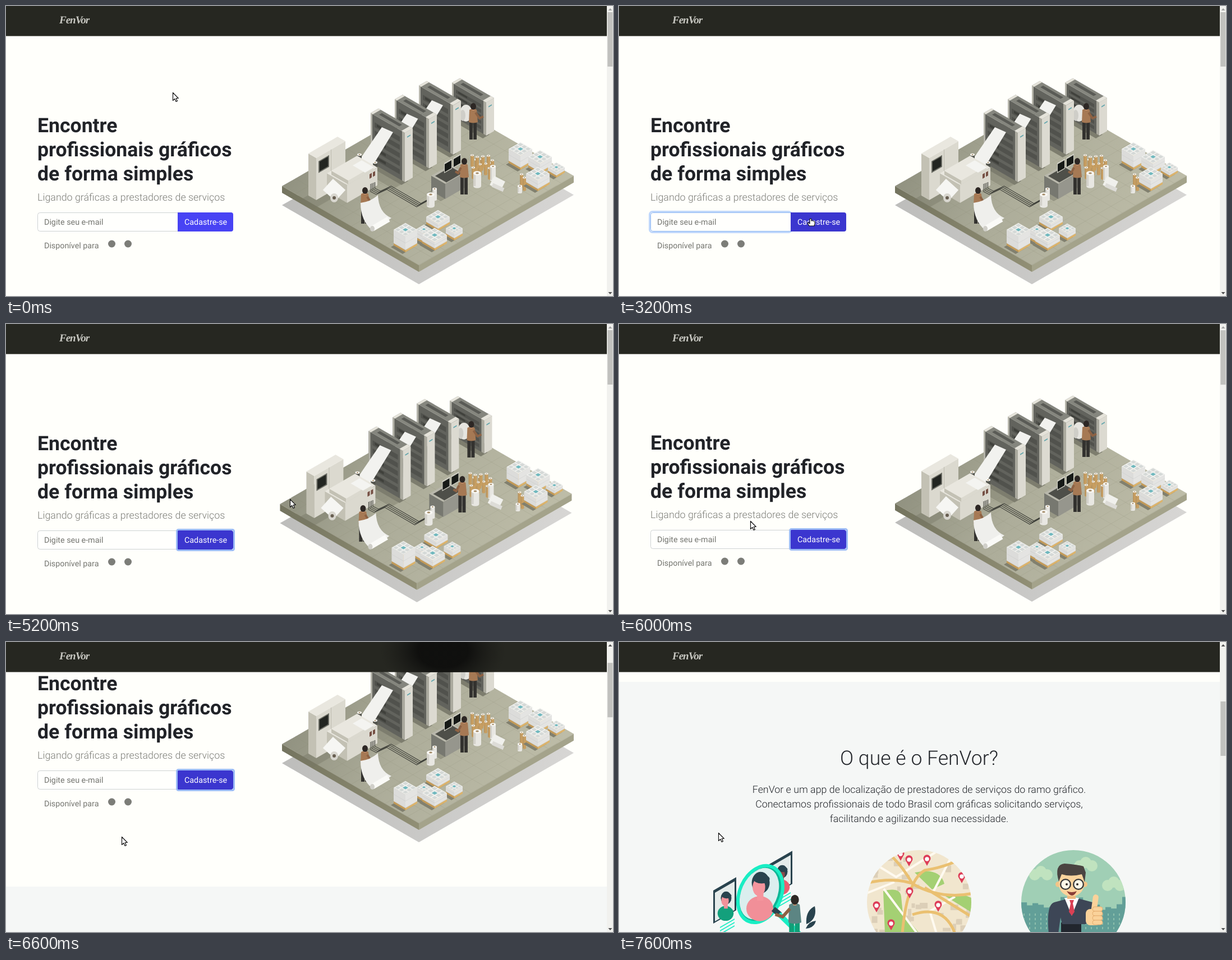
An HTML page for the animation above (8000 ms loop, 1082 px wide and 517 px high).

```html
<!DOCTYPE html>
<html lang="pt-BR">
<head>
<meta charset="utf-8">
<title>FenVor</title>
<style>
html, body { margin: 0; width: 100%; height: 100%; overflow: hidden; background: #fffffb; }
svg { display: block; }
text { font-family: Roboto, "Open Sans", sans-serif; font-size: 14.3px; fill: #747570; text-rendering: geometricPrecision; }
.title { font-size: 35.6px; font-weight: 700; fill: #212328; }
.lead { font-size: 17.85px; font-weight: 300; fill: #7b7c77; }
.about { font-size: 17.83px; font-weight: 300; fill: #22252a; text-anchor: middle; }
.about.big { font-size: 35.6px; }
.brand { font: italic 700 19px "Liberation Serif", serif; letter-spacing: -1px; fill: #c9c9c3; }
</style>
</head>
<body>
<svg width="1082" height="517" viewBox="0 0 1082 517">
  <defs>
    <linearGradient id="floor" y1=".3" y2=".6">
      <stop stop-color="#8c8d7c"/><stop offset=".45" stop-color="#adad9a"/><stop offset="1" stop-color="#bfbea9"/>
    </linearGradient>
    <linearGradient id="ground"><stop stop-color="#bdbdbb"/><stop offset="1" stop-color="#d7d6d4"/></linearGradient>
    <linearGradient id="edge"><stop stop-color="#74745f"/><stop offset="1" stop-color="#918f75"/></linearGradient>
    <radialGradient id="smoke"><stop offset=".4" stop-color="#0d0d0c" stop-opacity=".9"/><stop offset="1" stop-color="#1a1a17" stop-opacity="0"/></radialGradient>
    <clipPath id="disc"><circle r="93"/></clipPath>
    <clipPath id="barClip"><rect width="1071" height="54"/></clipPath>
  </defs>
  <rect width="1082" height="517" fill="#fffffb"/>
  <g id="page">
    <text class="title" x="56" y="225">Encontre</text>
    <text class="title" x="56" y="268">profissionais gráficos</text>
    <text class="title" x="56" y="311">de forma simples</text>
    <text class="lead" x="56" y="346.5">Ligando gráficas a prestadores de serviços</text>
    <rect id="inputRing" x="54.5" y="366.5" width="253" height="37" rx="5" fill="none" stroke="#bfd7fb" stroke-width="3"/>
    <rect id="input" x="56.5" y="368.5" width="260" height="33" rx="4" fill="#fffffd"/>
    <path id="button" d="M306 368h95a4 4 0 0 1 4 4v26a4 4 0 0 1-4 4h-95z"/>
    <rect id="buttonRing" x="304.5" y="366.5" width="102" height="37" rx="3" fill="none" stroke="#9dbcf6" stroke-width="3"/>
    <text x="68" y="390">Digite seu e-mail</text>
    <text x="318" y="390" style="fill:#fff">Cadastre-se</text>
    <text x="68" y="432">Disponível para</text>
    <circle cx="188.5" cy="424" r="6.5" fill="#7c7d78"/>
    <circle cx="217.5" cy="424" r="6.5" fill="#7c7d78"/>
    <g id="scene"></g>
    <rect y="575" width="1071" height="560" fill="#f5f7f6"/>
    <g transform="translate(0 504)">
      <text class="about big" x="535" y="219">O que é o FenVor?</text>
      <text class="about" x="535" y="269">FenVor e um app de localização de prestadores de serviços do ramo gráfico.</text>
      <text class="about" x="535" y="295">Conectamos profissionais de todo Brasil com gráficas solicitando serviços,</text>
      <text class="about" x="535" y="321">facilitando e agilizando sua necessidade.</text>
      <g id="search"></g>
      <g transform="translate(535 464)"><g id="map" clip-path="url(#disc)"></g></g>
      <g transform="translate(810 464)"><g id="man" clip-path="url(#disc)"></g></g>
    </g>
  </g>

  <g clip-path="url(#barClip)">
    <rect width="1071" height="53.6" fill="#262721"/>
    <ellipse id="haze" cx="779" cy="154" rx="112" ry="78" fill="url(#smoke)"/>
    <text class="brand" x="95" y="31">FenVor</text>
  </g>
  <rect x="1071" width="11" height="517" fill="#f1f1ee"/>
  <path id="up" d="M1073.5 8l3.5-4 3.5 4z"/><path d="M1073.5 510l3.5 4 3.5-4z" fill="#505050"/>
  <rect id="thumb" x="1072.3" y="11" width="9" height="97" fill="#c1c1be"/>

  <g id="cursor" stroke="#111" stroke-width="1.2" stroke-linejoin="round" fill="#fff">
    <path id="arrow" d="M.5.5v14l3.3-3 2.3 5 2.3-1-2.2-5h4.1z"/>
    <path id="beam" d="M-3-7h6M0-7v14M-3 7h6M-2 1h4" stroke-width="1.5"/>
    <path id="hand" d="M-3 7l-3-5 1-1 3 2v-8q1.500-2 3 0v3q4-1 6 2v3l-1 4z"/>
  </g>
</svg>
<script>
const $ = id => document.getElementById(id);
const SLOPE = .5774;
const times = (n, draw) => Array.from({length: n}, (_, i) => draw(i)).join('');
const rand = n => Math.abs(Math.sin(n * 12.9898 + 4) * 43758.5453) % 1;
const shape = (fill, d) => `<path fill="${fill}" d="${d}"/>`;
const poly = (fill, ...points) => shape(fill, `M${points.join(' ')}z`);
const line = (d, color, width = 1) => `<path d="${d}" fill="none" stroke="${color}" stroke-width="${width}"/>`;
const oval = (fill, x, y, rx, ry = rx) => `<ellipse cx="${x}" cy="${y}" rx="${rx}" ry="${ry}" fill="${fill}"/>`;
const rect = (fill, x, y, w, h) => `<rect x="${x}" y="${y}" width="${w}" height="${h}" fill="${fill}"/>`;
const place = (x, y, scale, art) => `<g transform="translate(${x} ${y}) scale(${scale})">${art}</g>`;

// Isometric helpers take the front bottom corner of a solid.
function face(fill, x, y, side, s0, s1, z0, z1) {
  const at = (s, z) => [x + side * s, y - s * SLOPE - z];
  return poly(fill, ...at(s0, z0), ...at(s1, z0), ...at(s1, z1), ...at(s0, z1));
}
function lid(fill, x, y, a0, a1, b0, b1) {
  const at = (a, b) => [x - a + b, y - (a + b) * SLOPE];
  return poly(fill, ...at(a0, b0), ...at(a1, b0), ...at(a1, b1), ...at(a0, b1));
}
const box = (x, y, a, b, h, [left, right, top]) =>
  face(left, x, y, -1, 0, a, 0, h) + face(right, x, y, 1, 0, b, 0, h) + lid(top, x, y - h, 0, a, 0, b);
const CREAM = ['#c3c1b4', '#dbd9cf', '#e9e7df'];

const press = (x, y, h) =>
  lid('#7d7d6e', x - 6, y + 5, 0, 62, 0, 12) +
  box(x, y, 61, 14, h, ['#62635d', '#dcdad1', '#85867e']) +
  face('#aaa99e', x, y, -1, 0, 5, 0, h) + face('#b5b4aa', x, y, -1, 58, 61, 0, h) +
  lid('#5a5b56', x, y - h - 1, 14, 50, 4, 9) + lid('#e5e3da', x, y - h, 0, 6, 0, 14) + lid('#e5e3da', x, y - h, 57, 61, 0, 14) +
  times(5, i => face('#51524d', x, y, -1, 9, 54, h * (.1 + i * .165), h * (.2 + i * .165)) +
    face('#3f403b', x, y, -1, 34, 50, h * (.13 + i * .165), h * (.18 + i * .165))) +
  face('#61a5ad', x, y, 1, 4, 10, h - 11, h - 9);

const sheet = (x, y) => shape('#f2f2ef', `M${x} ${y}l20 9-36 59-23-11z`);

const stack = (x, y, w, h) =>
  lid('#81806f', x - 5, y + 3, 0, w, 0, w) +
  box(x, y, w, w, 4, ['#c39a58', '#dcb36b', '#e2c58f']) +
  box(x, y - 4, w, w, h, ['#dcdcda', '#e4e4e2', '#f1f1ee']) +
  times(2, i => face('#cbccca', x, y - 4, -1, 0, w, h * i / 2, h * i / 2 + .7) +
    face('#d2d3d1', x, y - 4, 1, 0, w, h * i / 2, h * i / 2 + .7)) +
  times(9, i => {
    const a = w * (.06 + i % 3 * .32), b = w * (.06 + (i / 3 | 0) * .32);
    return lid(i == 4 ? '#70b8be' : '#d5d9d7', x, y - h - 4, a, a + w * .24, b, b + w * .24);
  });

const tube = (x, y, r, h, color = '#e8e7e2') =>
  shape(color, `M${x - r} ${y - h}v${h}a${r} ${r * .55} 0 0 0 ${2 * r} 0v${-h}z`) +
  rect('#77725f30', x - r, y - h, r * .6, h) +
  oval('#f8f7f3', x, y - h, r, r * .55) + oval('#a38a67', x, y - h, r * .4, r * .22);

const person = (x, y, reach, shirt = '#a67954', legs = '#33322f', scale = 1) => place(x, y, scale,
  rect(legs, -6, -33, 6, 33) + rect(legs, 1, -33, 6, 33) +
  shape(shirt, 'M-6-53q7-4 13 0l2 22q-8 3-16 0z') +
  line(`M${Math.sign(reach) * 5}-48l${reach / 2} 10 ${reach / 2}-3`, '#8d6244', 4) +
  rect('#d69b76', -1, -58, 4, 6) + oval('#2d2724', 1, -59, 5, 6));

function floor() {
  const slab = (fill, y) => lid(fill, 736, y, 0, 244, 0, 276);
  return slab('url(#ground)', 496) + box(736, 474, 244, 276, 12, ['url(#edge)', '#a4a38b', 'url(#floor)']) +
    times(12, i => lid('#83836f38', 736, 462, 0, 244, i * 23, i * 23 + .7) + lid('#83836f38', 736, 462, i * 20, i * 20 + .7, 0, 276)) +
    lid('#75766566', 690, 326, 0, 70, 0, 20) + lid('#75766566', 548, 362, 0, 26, 0, 60);
}

const presses = () =>
  press(856, 231, 59) + oval('#e6e5e0', 820, 191, 11, 15) + oval('#cfcec8', 814, 195, 5, 10) + person(832, 238, 14) +
  times(3, i => press(797 - 43 * i, 265 + 24.5 * i, 88) + sheet(759 - 44.5 * i, 168 + 24 * i));

const printer = () =>
  box(553, 346, 14, 52, 75, CREAM) + face('#6b6c64', 553, 346, 1, 4, 23, 46, 67) + face('#222521', 553, 346, 1, 6, 21, 48, 65) +
  face('#bdbbb0', 553, 346, 1, 26, 27, 0, 75) +
  tube(630, 274, 4, 9, '#54554e') + tube(658, 288, 4, 9, '#54554e') +
  box(608, 351, 36, 54, 32, CREAM) + box(610, 318, 30, 45, 7, CREAM) + lid('#f4f4f1', 640, 297, 0, 22, 0, 16) +
  times(2, i => face('#765044', 608, 351, 1, 40 + i * 6, 44 + i * 6, 20, 28)) +
  line('M594 318l-18 20', '#f6f6f3', 30) + oval('#d8d6cf', 585, 342, 7, 8) + oval('#685f52', 585, 342, 3);

const cables = () => times(4, i => line(`M${650 + i * 2.5} ${317 - i}v${14 - i}l10 5 19-9 53 31 20-11`, '#3f403a', 1.1));

const desk = () =>
  lid('#77776877', 775, 348, 0, 25, 0, 34) + box(783, 344, 25, 34, 27, ['#777870', '#96968d', '#b9b8ac']) +
  lid('#4e4f49', 783, 318, 2, 22, 4, 32) +
  times(2, i => face('#d0cfc4', 781 + 16 * i, 298 - 9 * i, 1, 0, 14, 0, 18) + face('#171a17', 782 + 16 * i, 297 - 9 * i, 1, 0, 12, 1, 15)) +
  tube(764, 345, 4, 19) + tube(757, 356, 7, 20);

const tubes = () =>
  times(13, i => tube(831 + i * 17 % 39, 285 + i * 7 % 27, 3, 19, '#c79e61')) +
  tube(868, 310, 5, 24) + tube(840, 321, 7, 23) + person(816, 336, -10) +
  times(2, i => tube(919 + 5 * i, 322 + 6 * i, 3, 22, '#c79e61')) + tube(916, 332, 4, 11) +
  line('M880 308l-8 16', '#f0f0ec', 22) + line('M867 319l20 9', '#dddcd7', 7);

const stacks = () =>
  stack(917, 292, 21, 21) + stack(952, 300, 21, 15) + stack(981, 306, 15, 6) + stack(948, 330, 21, 15) +
  stack(770, 401, 21, 9) + stack(745, 424, 14, 14) + stack(799, 418, 15, 9) + stack(764, 436, 22, 11) + stack(712, 439, 21, 24);

const worker = () => person(639, 388, 12) +
  shape('#efefec', 'M632 351q18-2 31-14 1 31 24 41l-33 23q-22-18-22-50z') +
  line('M653 397l29-17', '#fafaf7', 10) + oval('#d0cfc9', 653, 397, 4, 5);

$('scene').innerHTML = [floor, presses, printer, cables, desk, tubes, stacks, worker].map(draw => draw()).join('');

const DARK = '#29434e', TEAL = '#19eec4';
const bust = (x, y, scale, skin, shirt) => place(x, y, scale,
  oval(DARK, 1, -5, 10, 12) + oval(shirt, 0, 24, 15, 14) + rect(skin, -3, 6, 7, 9) + oval(skin, -1, 0, 7, 10) + oval(DARK, 2, -9, 9, 5));
const portrait = (x, y, skin, shirt) =>
  face(DARK, x, y, 1, 0, 41, 0, 59) + face('#e4ebea', x + 3, y - 4, 1, 0, 35, 0, 51) + bust(x + 22, y - 41, .95, skin, shirt) +
  times(3, i => face(TEAL, x + 12, y + 8 + i * 6, 1, 0, 26, 0, 2));
$('search').innerHTML =
  portrait(168, 502, '#f3929a', '#13a07c') + portrait(268, 455, '#8d4a4b', '#e95f70') +
  `<g transform="rotate(24 251 449)">${oval(TEAL, 252, 449, 40, 56) + oval('#0cb796', 252, 449, 34, 50) + oval('#dbeeee', 250, 449, 32, 48)}</g>` +
  bust(251, 437, 1.6, '#f5959d', '#f18f98') +
  line('M275 476l12 10', DARK, 10) + line('M285 485l37 36', TEAL, 9) +
  person(312, 545, -18, '#5c8583', '#119f78', 1.45) +
  shape(DARK, 'M334 503q-2-24 15-32 5 23-15 32zm-1 8q5-13 18-14-3 13-18 14z');

const pin = (x, y) => shape('#dd3c57', `M${x} ${y}l-5-9a6.5 6.5 0 1 1 10 0z`) + oval('#fff', x, y - 12, 3.7);
$('map').innerHTML = rect('#f1e6ce', -93, -93, 186, 186) +
  times(40, i => rect('#dccfb8', rand(i) * 180 - 92, rand(i + 50) * 140 - 90, 6 + i % 3 * 4, 6 + i % 4 * 2)) +
  shape('#a4d073', 'M-64-20q30-8 32 10l3 30 30 36h-62zM-8-53q45-10 53 20l-22 10zM45-12q25-8 50 5v26z') +
  line('M-80-69l39 24 70-44M-94-16l50-20M-3 56l-60-80M31 56l-12-40 45-26M63-92L26-20', '#fffaf0', 4) +
  line('M-55-88q26 24 43 55 51 29 108 17M-95-34q48-11 81 0M-30 56q8-95 40-113 50-8 84-32M-12 22q57-19 76 34M10-26l84 52', '#eac071', 5) +
  pin(-33, -74) + pin(-18, -64) + pin(14, -65) + pin(76, -34) + pin(-17, -7) + pin(-76, 18) + pin(34, 17) + pin(-50, 50);

const cloud = (x, y) => times(3, i => oval('#c0e3bf', x + (i - 1) * 11, y - i % 2 * 6, 10));
$('man').innerHTML = rect('#a0cfb5', -93, -93, 186, 186) + cloud(-58, -49) + cloud(22, -65) + cloud(72, -30) +
  times(19, i => rect('#629f98', i * 10 - 93, 14 - rand(i) * 24, 10.2, 80) +
    times(4, j => rect('#8dbfac', i * 10 - 89, 20 + j * 8, 2, 4))) +
  rect('#22262e', -22, 36, 36, 24) +
  shape('#3d4656', 'M-44 56q-5-52 10-56l30-8h8l30 8q12 5 16 29l-24 6-4 4H-20l-3-12-4 29z') +
  poly('#fff', -16, -8, 10, -8, -3, 24) + shape('#da4054', 'M-7-4h8l-2 6 3 15-5 7-5-7 3-15z') +
  rect('#eeb97f', -11, -20, 15, 14) +
  oval('#f2c488', -27, -32, 5) + oval('#f2c488', 20, -32, 5) +
  '<rect x="-26" y="-58" width="45" height="47" rx="21" fill="#fbd49d"/>' +
  shape('#4a4441', 'M-26-37q-9-30 10-32 25 2 34 5l4 11-2 17-5-14q-20 5-36 0z') +
  times(2, i => oval('#353638', 23 * i - 14, -32, 10) + oval('#fff9e9', 23 * i - 14, -32, 7.7) + oval('#332f2d', 19 * i - 12, -32, 2)) +
  shape('#8b3e37', 'M-12-20q9 4 18 0-8 16-18 0z') +
  '<g fill="#fad29a"><rect x="33" y="-14" width="10" height="36" rx="5" transform="rotate(8 38 4)"/><rect x="22" y="12" width="26" height="29" rx="8"/></g>' +
  times(4, i => `<rect x="34" y="${8 + i * 8}" width="18" height="8" rx="4" fill="#fad29a" stroke="#e5ae70"/>`);

// Each glide: start, end, and the point the pointer reaches.
const HOME = [297, 154];
const glides = [
  [400, 800, 287, 189], [1000, 1400, 254, 265], [1400, 1800, 221, 381], [2000, 3200, 342, 385],
  [3600, 4200, 642, 292], [4800, 6000, 234, 351], [6000, 7000, 188, 344], [7200, 7600, 177, 340]
];
const part = (t, from, to) => Math.min(1, Math.max(0, (t - from) / (to - from)));
const easeOut = f => 1 - (1 - f) ** 2;
const pointer = t => glides.reduce(([x, y], [from, to, nx, ny]) => {
  const f = part(t, from, to);
  return [x + (nx - x) * f, y + (ny - y) * f];
}, HOME).map(Math.round);
const scrollAt = t => Math.round(300 * part(t, 5980, 7000) ** 1.55 + 204 * part(t, 7200, 7600));
const slideAt = t => 8 * (easeOut(part(t, 5000, 5600)) - easeOut(part(t, 4000, 4400)));

const show = (id, on) => $(id).setAttribute('display', on ? 'inline' : 'none');
const move = (id, x, y) => $(id).setAttribute('transform', `translate(${x} ${y})`);

function render(t) {
  const scroll = scrollAt(t), [x, y] = pointer(t);
  const over = (x0, y0, x1, y1) => x >= x0 && x < x1 && y >= y0 && y < y1;
  const inputFocus = t >= 2200 && t < 3400, buttonFocus = t >= 3400;
  const onButton = over(306, 368, 405, 402);
  const onText = over(56, 368, 306, 402) || over(56, 234, 404, 278);
  move('page', 0, -scroll);
  move('scene', slideAt(t), 0);
  move('haze', 0, -scroll);
  move('thumb', 0, scroll * .1885);
  move('cursor', x, y);
  show('inputRing', inputFocus);
  show('buttonRing', buttonFocus);
  show('hand', onButton);
  show('beam', onText);
  show('arrow', !onButton && !onText);
  $('input').setAttribute('stroke', inputFocus ? '#8fb8f3' : '#ced2d4');
  $('button').setAttribute('fill', onButton || buttonFocus ? '#3b36cf' : '#4843f4');
  $('up').setAttribute('fill', scroll > 1 ? '#505050' : '#a3a3a3');
}

const STEP = 200, LOOP = 8000, start = performance.now();
function tick() {
  const t = (performance.now() - start) % LOOP;
  render(Math.floor(t / STEP) * STEP);
  requestAnimationFrame(tick);
}
tick();
</script>
</body>
</html>
```
